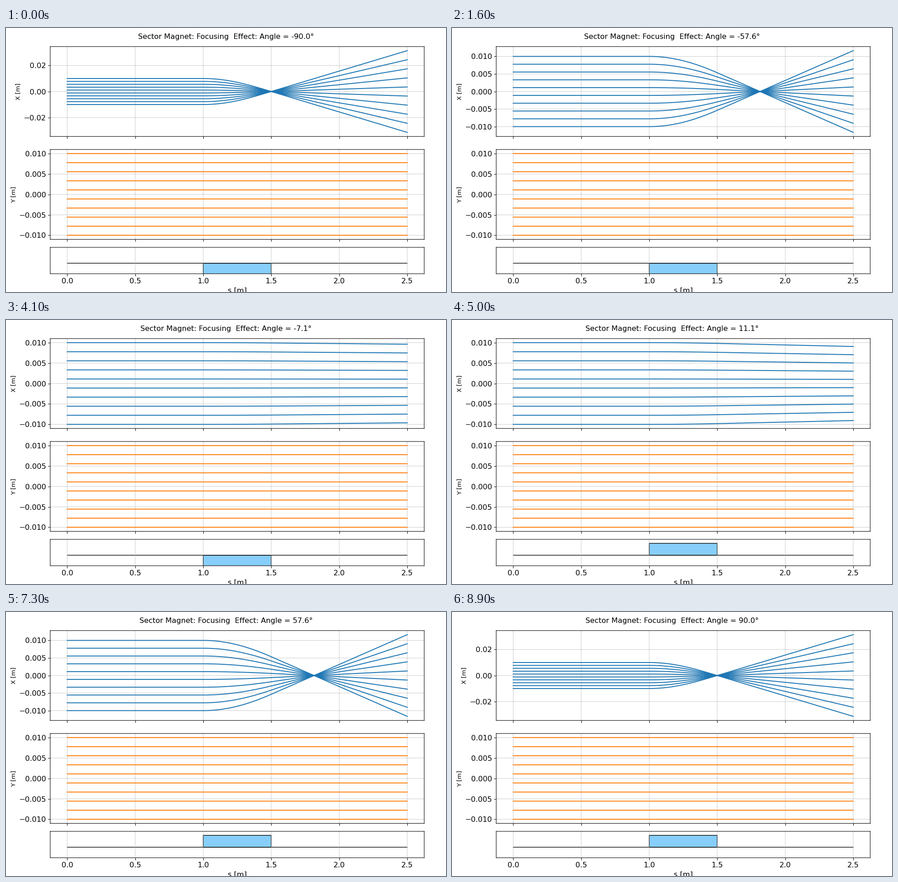
These frames come from a looping animation (966 by 580 pixels, 9 s). A matplotlib script:

```python
import numpy as np
import matplotlib.pyplot as plt
from matplotlib.animation import FuncAnimation
from matplotlib.patches import Rectangle

W, H, DPI = 966, 580, 96.6
FRAMES, INTERVAL = 90, 100
START, LENGTH, END = 1.0, 0.5, 2.5  # magnet entry, magnet length, beamline end [m]

plt.rcParams.update({
    "font.family": "DejaVu Sans",
    "font.size": 12,
    "lines.linewidth": 1.5,
    "grid.alpha": 0.6,
    "path.snap": False,  # keep soft, sub-pixel line positions
})

angles = np.linspace(-90, 90, FRAMES)
offsets = np.linspace(-0.01, 0.01, 10)
s = np.concatenate([[0], np.linspace(START, START + LENGTH, 60), [END]])


def ray_scale(angle):
    """Horizontal offset along s, relative to the initial offset."""
    a = np.radians(angle)
    inside = np.clip(s - START, 0, LENGTH)
    after = np.clip(s - START - LENGTH, 0, None)
    return np.cos(a * inside / LENGTH) - after * a / LENGTH * np.sin(a)


# The tiny surplus keeps the pixel height from being floored to H - 1.
fig = plt.figure(figsize=(W / DPI, (H + 0.001) / DPI), dpi=DPI, facecolor="white")


def add_panel(top, bottom):
    """Add a panel; its edges are given on a 1000 x 600 layout."""
    ax = fig.add_axes([0.1005, 1 - bottom / 600, 0.85, (bottom - top) / 600])
    ax.set_xlim(-0.05 * END, 1.05 * END)
    ax.set_xticks(np.arange(0, END + 0.1, 0.5))
    ax.grid(True)
    return ax


ax_x = add_panel(42.2, 246.5)
ax_y = add_panel(276.1, 480.4)
ax_s = add_panel(498.5, 558.5)

for ax, name in ((ax_x, "X [m]"), (ax_y, "Y [m]")):
    ax.set_ylabel(name, fontsize=10)
    ax.tick_params(labelbottom=False)

rays = [ax_x.plot([], [], color="C0")[0] for _ in offsets]
for y in offsets:
    ax_y.plot([0, END], [y, y], color="C1")
ax_y.set_ylim(-0.011, 0.011)

ax_s.set_ylim(-8 / 9, 4 / 3)
ax_s.set_yticks([])
ax_s.set_xlabel("s [m]")
ax_s.plot([0, END], [0, 0], color="black", lw=1, zorder=1.4)
magnet = ax_s.add_patch(
    Rectangle((START, 0), LENGTH, 1, facecolor="lightskyblue", edgecolor="black", lw=1)
)

title = fig.suptitle("", fontsize=12)


def update(i):
    angle = angles[i]
    scale = ray_scale(angle)
    for ray, x0 in zip(rays, offsets):
        ray.set_data(s, x0 * scale)
    limit = 1.1 * offsets[-1] * np.abs(scale).max()
    ax_x.set_ylim(-limit, limit)
    magnet.set_height(np.sign(angle))
    title.set_text(f"Sector Magnet: Focusing  Effect: Angle = {angle:.1f}°")
    return [*rays, magnet, title]


anim = FuncAnimation(fig, update, frames=FRAMES, interval=INTERVAL,
                     repeat=True, repeat_delay=0, blit=False)
plt.show()
```
